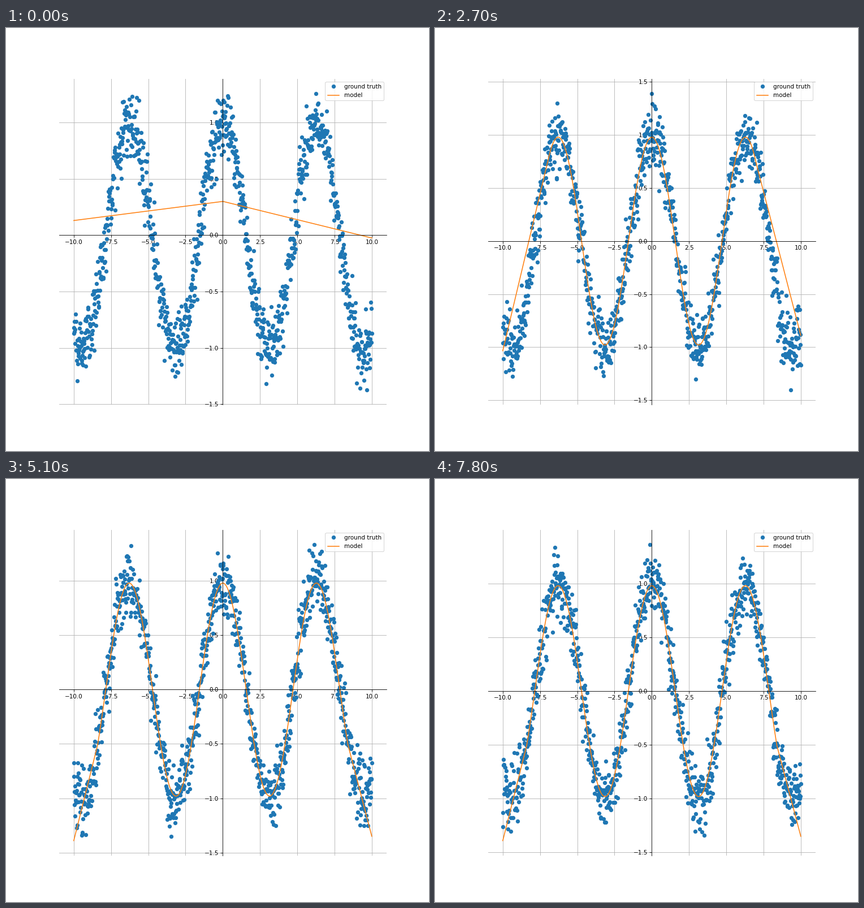
These frames come from a looping animation (748x748 px, 8 s). A matplotlib script:

```python
import numpy as np
import matplotlib.pyplot as plt
from matplotlib.animation import FuncAnimation

SIZE, INCHES = 748, 10
INTERVAL, FRAMES, HOLD = 100, 80, 3  # a new training step every 300 ms
NOISE, MAX_NOISE = 0.15, 0.41
STAGES = (0, 6, 11)  # steps: untrained, centre learned, fully learned

x = np.linspace(-10, 10, 1000)


def samples(step):
    noise = np.random.default_rng(step).normal(0, NOISE, x.size)
    return np.cos(x) + np.clip(noise, -MAX_NOISE, MAX_NOISE)


def model(step):
    """Cosine within the learned reach, straight tails beyond it."""
    reach = np.interp(step, STAGES, (0, 4.95, 8.4))
    left = np.interp(step, STAGES, (.13, -.5, -1.39))
    right = np.interp(step, STAGES, (-.025, -.2, -1.35))
    height = np.interp(step, (0, 2), (.3, .98))

    distance = np.abs(x)
    edge = height * np.cos(reach)
    end = np.where(x < 0, left, right)
    tail = edge + (end - edge) * (distance - reach) / (10 - reach)
    return np.where(distance < reach, height * np.cos(x), tail)


fig, ax = plt.subplots(figsize=(INCHES, INCHES), dpi=SIZE / INCHES)
dots, = ax.plot(x, samples(0), "o", label="ground truth")
line, = ax.plot(x, model(0), label="model")
for name in ("left", "bottom"):
    ax.spines[name].set_position("zero")
for name in ("right", "top"):
    ax.spines[name].set_visible(False)
ax.grid(True)
ax.legend(loc="upper right")


def update(frame):
    step = frame // HOLD
    dots.set_ydata(samples(step))
    line.set_ydata(model(step))
    ax.relim()
    ax.autoscale_view()
    return dots, line


anim = FuncAnimation(fig, update, frames=FRAMES, interval=INTERVAL,
                     repeat=True, repeat_delay=0)
plt.show()
```
